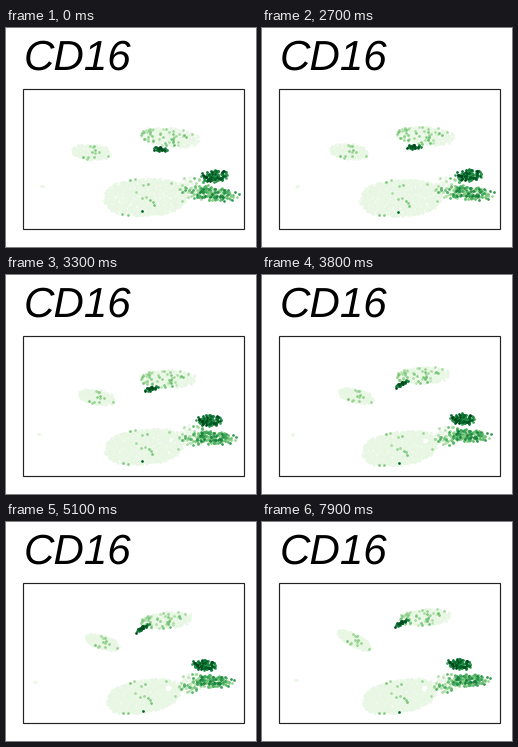
Write a matplotlib script that moves like this. It is 250 px wide and 219 px high and loops after 8000 ms.

```python
import numpy as np
import matplotlib.pyplot as plt
from matplotlib.animation import FuncAnimation
from matplotlib.patches import Rectangle

W, H, DPI = 250, 219, 100
FRAMES, STEP = 80, 100
MOVE, FIRST, SECOND = 3600, 1500, 6600  # length and starts of the moves, ms
SQUASH = 0.88  # clusters tighten during the first move
PALE = (0.08, 0.11)

plt.rcParams["text.hinting"] = "none"
rng = np.random.default_rng(16)


def ease(ms):
    """Cubic in and out."""
    u = min(max(ms / MOVE, 0), 1)
    return 4 * u ** 3 if u < 0.5 else 1 - 4 * (1 - u) ** 3


def disk(n, jitter):
    """Rounded unit square filled by a jittered spiral."""
    k = np.arange(n)
    angle = k * np.pi * (3 - np.sqrt(5))
    x, y = np.cos(angle), np.sin(angle)
    corner = (np.abs(x) ** 2.4 + np.abs(y) ** 2.4) ** (-1 / 2.4)
    r = np.sqrt((k + 0.5) / n) * corner
    return r * x + rng.normal(0, jitter, n), r * y + rng.normal(0, jitter, n)


def cluster(n, size, path, slopes, strong, share=(1, 0), jitter=0.02):
    """Dots of a sheared blob in its three poses, with colour levels.

    share gives the part of strong dots at the centre and its change to the right.
    """
    u, v = disk(n, jitter)
    poses = []
    for (cx, cy), slope, scale in zip(path, slopes, (1, SQUASH, SQUASH)):
        x, y = u * size[0] * scale, v * size[1] * scale
        poses.append(np.column_stack([cx + x, cy + y + slope * x]))
    is_strong = rng.random(n) < share[0] + share[1] * u
    levels = np.where(is_strong, rng.uniform(*strong, n), rng.uniform(*PALE, n))
    return np.array(poses), levels


def open_hole(points, centre=(162, 166), push=3.0, width=3.5):
    d = points - centre
    dist = np.linalg.norm(d, axis=-1, keepdims=True) + 1e-6
    return points + d / dist * push * np.exp(-(dist / width) ** 2)


flat = (0, 0, 0)
left = cluster(170, (19, 7.5), [(85, 124), (96, 120), (92, 118)], (0.05, 0.25, 0.45),
               (0.3, 0.5), (0.05, 0))
top = cluster(260, (28, 9), [(164, 109), (160, 98), (163, 95)], (0.1, -0.08, -0.06),
              (0.28, 0.55), (0.22, -0.18), 0.04)
tip = cluster(24, (7.5, 2.2), [(154, 121), (136, 106), (139, 101)], (0.1, -0.6, -0.5),
              (0.75, 1), jitter=0.1)
big = cluster(900, (41, 18.5), [(139, 169), (137, 174), (137, 174)], (-0.03, -0.14, -0.15),
              (0.35, 0.5), (0.02, 0))
head = cluster(95, (12.5, 5.2), [(208, 148), (198, 143), (197, 142)], (-0.1, 0.05, 0.05),
               (0.6, 1), jitter=0.12)
body = cluster(125, (19, 6.5), [(209, 166), (207, 159), (207, 158)], (0.08, 0.05, 0),
               (0.35, 0.8), (0.9, 0), 0.12)
bridge = cluster(90, (15, 10), [(187, 160), (185, 161), (184, 161)], (0.1, -0.15, -0.15),
                 (0.3, 0.6), (0.5, 0.35), 0.1)
lone = cluster(1, (0, 0), [(136, 183), (137, 189), (137, 190)], flat, (0.9, 0.9))
speck = cluster(3, (1.5, 0.5), [(36, 158), (29, 160), (34, 158)], flat, PALE)

big[0][1:] = open_hole(big[0][1:])

parts = (left, top, tip, big, head, body, bridge, lone, speck)
levels = np.concatenate([part[1] for part in parts])
order = np.argsort(levels, kind="stable")  # strongest on top
levels = levels[order]
start, middle, end = np.concatenate([part[0] for part in parts], axis=1)[:, order]


def positions(ms):
    first = ease(ms - FIRST)
    second = ease(ms - SECOND) / ease(FRAMES * STEP - STEP - SECOND)
    p = start + first * (middle - start) + second * (end - middle)
    return np.round(p) + 0.5


fig = plt.figure(figsize=(W / DPI, H / DPI), dpi=DPI, facecolor="white")
ax = fig.add_axes([0, 0, 1, 1])
ax.set_xlim(0, W)
ax.set_ylim(H, 0)
ax.axis("off")
ax.text(17.5, 41.4, "CD16", family="Liberation Sans", style="italic", size=30.3,
        ha="left", va="baseline", color="black")
ax.add_patch(Rectangle((16.5, 60.5), 221, 140, fill=False, ec="#222222", lw=0.85))
dots = ax.scatter(*positions(0).T, s=3.8, c=plt.cm.Greens(levels), linewidths=0)


def draw(i):
    dots.set_offsets(positions(i * STEP))
    return (dots,)


anim = FuncAnimation(fig, draw, frames=FRAMES, init_func=lambda: draw(0),
                     interval=STEP, repeat=True, repeat_delay=0)
plt.show()
```
